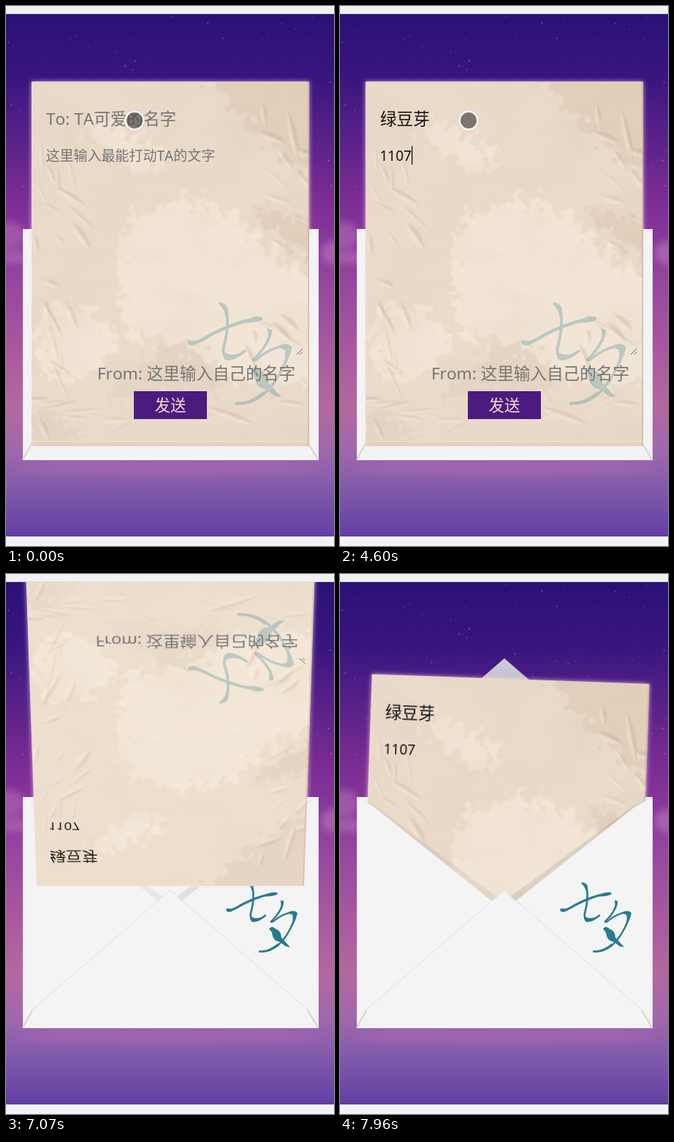
Animation, 449 px wide and 736 px high, one loop 7990 ms. Source, as an HTML page:

```html
<!DOCTYPE html>
<html lang="zh">
<head>
<meta charset="utf-8">
<title>Letter</title>
<style>
  html, body { margin: 0; width: 100%; height: 100%; overflow: hidden; background: #f2f2f4; }
  #stage { position: relative; width: 449px; height: 736px; overflow: hidden; }
  svg { position: absolute; left: 0; top: 0; display: block; }
  text { font-family: "Noto Sans", "Noto Sans CJK SC", "Noto Sans CJK", sans-serif; font-kerning: none; white-space: pre; }
  #front { z-index: 2; }
  #top { z-index: 5; }
  #window { position: absolute; left: 0; top: 11px; width: 449px; overflow: hidden; }
  #letter { position: absolute; left: 35px; top: 92px; width: 380px; height: 497px;
    box-shadow: 0 0 6px rgba(255, 225, 245, .75); will-change: transform; }
  .big { font-size: 22.6px; }
  .small { font-size: 19px; }
  .hint { fill: #757575; }
</style>
</head>
<body>
<div id="stage">
  <svg id="back" width="449" height="736">
    <defs>
      <linearGradient id="sky" x1="0" y1="0" x2="0" y2="1">
        <stop offset="0" stop-color="#2a1177"/><stop offset=".12" stop-color="#39157f"/>
        <stop offset=".25" stop-color="#5c2389"/><stop offset=".34" stop-color="#782b92"/>
        <stop offset=".41" stop-color="#853499"/><stop offset=".52" stop-color="#96479f"/>
        <stop offset=".64" stop-color="#a9589f"/><stop offset=".75" stop-color="#b3689f"/>
        <stop offset=".84" stop-color="#9f67ae"/><stop offset=".92" stop-color="#7d58aa"/>
        <stop offset="1" stop-color="#613fa3"/>
      </linearGradient>
      <linearGradient id="flap" x1="0" y1="0" x2="0" y2="1">
        <stop offset="0" stop-color="#dad8de" stop-opacity=".95"/>
        <stop offset=".2" stop-color="#d0cdd6" stop-opacity=".9"/>
        <stop offset=".85" stop-color="#d0cdd6" stop-opacity="0"/>
      </linearGradient>
      <filter id="haze" x="-50%" y="-50%" width="200%" height="200%"><feGaussianBlur stdDeviation="5"/></filter>
      <g id="seal" fill="none" stroke="#2a7a8c" stroke-linecap="round" stroke-linejoin="round">
        <path d="M2 38Q9 38 17 33T40 22T69 15" stroke-width="3"/>
        <path d="M0 36Q5 34 10 38Q6 41 3 40ZM56 16Q66 11 71 15Q67 19 55 19Z" fill="#2a7a8c" stroke="none"/>
        <path d="M31 1Q37 3 37 9Q39 22 35 38Q32 47 36 51Q44 53 54 45" stroke-width="2.6"/>
        <path d="M29 1Q36 -1 38 6L36 12Q34 5 29 1ZM34 46Q32 53 38 54Q48 53 54 45Q44 50 38 48Z" fill="#2a7a8c" stroke="none"/>
        <path d="M78 26Q76 40 63 52Q60 55 65 53Q80 40 95 41Q97 43 93 52Q85 73 72 85Q61 94 46 94" stroke-width="2.3"/>
        <path d="M84 41Q94 36 98 42Q95 54 89 63Q93 48 91 44ZM75 24Q81 26 78 32L76 38ZM45 95Q61 97 73 85L71 83Q60 92 45 95Z" fill="#2a7a8c" stroke="none"/>
        <path d="M59 63Q63 58 68 63Q76 66 76 75L88 88L82 87L74 81Q64 80 63 68Z" fill="#2a7a8c" stroke="none"/>
      </g>
    </defs>
    <rect y="11" width="449" height="712" fill="url(#sky)"/>
    <g filter="url(#haze)" fill="#c07cc0">
      <ellipse cx="4" cy="312" rx="22" ry="18" opacity=".45"/><ellipse cx="10" cy="342" rx="26" ry="10" opacity=".45"/>
      <ellipse cx="447" cy="336" rx="16" ry="16" opacity=".55"/>
      <ellipse cx="225" cy="632" rx="210" ry="10" opacity=".2"/>
    </g>
    <g id="stars"></g>
    <path d="M225 115L428 290H22Z" fill="url(#flap)"/>
    <path d="M23 304H428V450H23Z" fill="#f4f4f4"/>
  </svg>

  <div id="window"><div id="letter">
    <svg width="380" height="497">
      <defs>
        <filter id="ragged" x="-20%" y="-20%" width="140%" height="140%">
          <feTurbulence type="fractalNoise" baseFrequency=".07" numOctaves="4" seed="7"/>
          <feDisplacementMap in="SourceGraphic" scale="58" xChannelSelector="R" yChannelSelector="G"/>
          <feGaussianBlur stdDeviation=".8"/>
        </filter>
        <filter id="crumple" x="0" y="0" width="100%" height="100%">
          <feTurbulence type="fractalNoise" baseFrequency=".012 .02" numOctaves="4" seed="3"/>
          <feColorMatrix values="0 0 0 0 .74  0 0 0 0 .62  0 0 0 0 .5  2.4 0 0 0 -1.05"/>
        </filter>
        <filter id="soft"><feGaussianBlur stdDeviation="1.2"/></filter>
      </defs>
      <rect width="380" height="497" fill="#eadaca"/>
      <g filter="url(#ragged)">
        <path d="M130 190Q200 140 270 180L390 280V410Q330 420 260 400Q190 340 130 350Q110 280 130 190ZM10 310Q70 290 120 350Q90 420 10 400ZM60 60Q120 40 190 110L150 130Z" fill="#f2e5d6"/>
        <path d="M240 -10L390 -10V130Q310 90 240 -10ZM300 170L390 190V240Q340 220 300 170Z" fill="#e1cebb"/>
        <path d="M100 440Q160 340 235 370L260 420L190 425ZM0 440L60 470L50 500H0Z" fill="#e5d4c3"/>
      </g>
      <rect width="380" height="497" filter="url(#crumple)" opacity=".3"/>
      <g id="creases" filter="url(#soft)"></g>
      <path d="M379 0V497" stroke="#bfa58e" stroke-width="2" opacity=".5"/>
      <rect y="490" width="380" height="7" fill="#d8c3ae" opacity=".3"/>
      <path d="M0 490.500H380" stroke="#f4eadf" opacity=".6"/>
      <rect id="warm" width="380" height="497" fill="#fff4e4" opacity=".18"/>
      <use href="#seal" transform="translate(213 301) scale(1.465)" opacity=".27"/>
      <text id="name" class="big" x="20" y="59"></text>
      <text id="message" class="small" x="19.500" y="108"></text>
      <text class="big hint" x="361" y="406" text-anchor="end">From: 这里输入自己的名字</text>
      <path d="M363 372L371 364M367.500 372L371 368.500" stroke="#666"/>
      <g id="button">
        <rect x="140" y="422" width="100" height="38" fill="#4c1b80"/>
        <text x="190" y="449" text-anchor="middle" font-size="21.500" fill="#f3dfcd">发送</text>
      </g>
      <rect id="caret" width="1.200" fill="#000"/>
    </svg>
  </div></div>

  <svg id="front" width="449" height="736">
    <path d="M28 306L47 315L215 440L208 446Z" opacity=".055"/>
    <path d="M422 306L402 316L233 440L240 446Z" opacity=".085"/>
    <path d="M23 304L46 317L208 446L225 431L240 446L404 317L428 304V619H23Z" fill="#f4f4f4"/>
    <path d="M23 618L36 594L225 431L413 594L428 618" fill="none" stroke="#dfdfdf"/>
    <path d="M23 618L36 595M427 618L413 595" stroke="#d9d4cd" stroke-width="2"/>
    <use href="#seal" transform="translate(301 420.500)"/>
  </svg>

  <svg id="top" width="449" height="736">
    <rect width="449" height="11" fill="#f2f2f3"/>
    <path d="M0 10.500H449" stroke="#dcdce2"/>
    <rect y="723" width="449" height="13" fill="#f1f3f8"/>
    <g id="popup">
      <rect x="64" y="173" width="400" height="93" fill="#fff" stroke="#d0d0d0"/>
      <text id="pinyin" class="small" x="76" y="206" fill="#333"></text>
      <path d="M64 219.500H449" stroke="#e4e4e4"/>
      <text id="choices" class="small" x="76" y="250" fill="#333"></text>
    </g>
    <g id="pointer">
      <circle r="14" fill="#777" opacity=".35"/>
      <circle r="11.500" fill="#333" opacity=".5"/>
      <circle r="12.400" fill="none" stroke="#fff" stroke-width="2.600"/>
    </g>
  </svg>
</div>
<script>
const LOOP = 7990, FLIP = 6872, DROP = 7650;
const el = id => document.getElementById(id);
const clamp = x => Math.max(0, Math.min(1, x));
const mix = (a, b, p) => a + (b - a) * p;
const smooth = p => p * p * (3 - 2 * p);
const show = (node, on) => node.setAttribute("visibility", on ? "visible" : "hidden");
const setText = (node, s) => { if (node.textContent !== s) node.textContent = s; };
// Value of the latest [time, value] step reached.
const stepAt = (steps, t) => steps.reduce((v, [at, value]) => t >= at ? value : v, null);

// CSS "ease": cubic-bezier(.25, .1, .25, 1)
function ease(x) {
  x = clamp(x);
  if (x === 0 || x === 1) return x;
  const curve = (a, b, s) => 3 * a * s * (1 - s) ** 2 + 3 * b * s * s * (1 - s) + s ** 3;
  let lo = 0, hi = 1;
  for (let i = 0; i < 24; i++) {
    const mid = (lo + hi) / 2;
    if (curve(.25, .25, mid) < x) lo = mid; else hi = mid;
  }
  return curve(.1, 1, lo);
}

let seed = 11;
const random = () => (seed = seed * 16807 % 2147483647) / 2147483647;

function add(parent, tag, attrs) {
  const node = document.createElementNS("http://www.w3.org/2000/svg", tag);
  for (const key in attrs) node.setAttribute(key, attrs[key]);
  parent.append(node);
}

for (let i = 0; i < 190; i++) {
  add(el("stars"), "circle", {
    cx: random() * 449, cy: 14 + random() * 370,
    r: .4 + random() * .6, fill: "#e0a8dc", opacity: .12 + random() * .5
  });
}

// Crumpled edges: thin wedges running inwards, each with a light side.
for (let i = 0; i < 60; i++) {
  const side = i % 3;
  const x = side === 0 ? 380 - random() * 90 : side === 1 ? random() * 380 : random() * 60;
  const y = side === 0 ? random() * 360 : side === 1 ? 425 + random() * 65 : random() * 490;
  const len = 20 + random() * 60, angle = .3 + random() * 1.2 + (side === 1 ? 2 : 0);
  const dx = Math.cos(angle) * len, dy = Math.sin(angle) * len, w = 3 + random() * 7;
  const wedge = w => `M${x} ${y}q${dx / 2 + w} ${dy / 2 - w} ${dx} ${dy}q${-dx / 2} ${-dy / 2} ${-dx} ${-dy}`;
  add(el("creases"), "path", { d: wedge(w), fill: "#c3a78d", opacity: .16 + random() * .24 });
  add(el("creases"), "path", { d: wedge(-w), fill: "#f8eee2", opacity: .4 });
}

const NAME = [[0, "To: TA可爱的名字"], [1850, "l"], [3040, "绿豆芽"]];
const MESSAGE = [[0, "这里输入最能打动TA的文字"], [3670, "1"], [4080, "11"], [4320, "110"], [4600, "1107"]];
const PINYIN = [[0, ""], [1850, "l"], [1930, "lv"], [2010, "lv'd"], [2090, "lv'do"],
  [2270, "lv'dou"], [2330, "lv'dou'y"], [2360, "lv'dou'ya"]];
const CHOICES = [[0, "1.了  2.来  3.里  4.老"], [1930, "1.绿  2.率  3.旅  4.路"],
  [2010, "1.绿豆  2.绿的  3.绿地"], [2330, "1.绿豆芽  2.绿豆  3.绿"], [2580, "1.绿豆芽  2.绿豆  3.绿  4.率"]];
// Caret as [x, field]; null while blinked off.
const CARET = [[0, null], [680, [20, 0]], [1150, null], [1670, [20, 0]], [1850, [26, 0]], [2800, null],
  [3040, [87, 0]], [3300, [20, 1]], [3670, [31, 1]], [4080, [42, 1]], [4320, [53, 1]], [4600, [63, 1]], [5080, null]];

function drawFields(t) {
  setText(el("name"), stepAt(NAME, t));
  el("name").setAttribute("fill", t < 1850 ? "#757575" : "#111");
  setText(el("message"), stepAt(MESSAGE, t));
  el("message").setAttribute("fill", t < 3670 ? "#757575" : "#111");
  const caret = stepAt(CARET, t);
  show(el("caret"), caret);
  if (caret) {
    const [x, field] = caret;
    el("caret").setAttribute("x", x);
    el("caret").setAttribute("y", field ? 88 : 35);
    el("caret").setAttribute("height", field ? 25 : 30);
  }
  show(el("popup"), t >= 1850 && t < 3040);
  setText(el("pinyin"), stepAt(PINYIN, t));
  setText(el("choices"), stepAt(CHOICES, t));
}

function drawPointer(t) {
  const go = smooth(clamp((t - 5060) / 500)), leave = clamp((t - 5820) / 250) ** 1.5;
  const x = mix(mix(176, 229, go), 466, leave);
  const y = mix(mix(156, 548, go), 606, leave);
  el("pointer").setAttribute("transform", `translate(${x} ${y})`);
}

function drawLetter(t) {
  const flip = ease((t - FLIP) / 800), drop = ease((t - DROP) / 800);
  const dropping = t >= DROP;
  const scale = ease((7960 - DROP) / 800);
  const y = dropping ? mix(-320, 39, drop / scale) : -320 * flip;
  const turn = dropping ? `rotate(${2 * drop / scale}deg)` : `rotateX(${360 * flip}deg)`;
  el("letter").style.transform = `perspective(3600px) translateY(${y}px) ${turn}`;
  // Inside the envelope, nothing may stick out below its opening.
  el("window").style.height = dropping ? "470px" : "712px";
  el("window").style.zIndex = dropping ? 1 : 3;
  show(el("button"), t < FLIP);
  show(el("warm"), t >= 6850 && !dropping);
}

function draw(t) {
  drawFields(t);
  drawPointer(t);
  drawLetter(t);
}

const start = performance.now();
function tick() {
  draw((performance.now() - start) % LOOP);
  requestAnimationFrame(tick);
}
tick();
</script>
</body>
</html>
```
